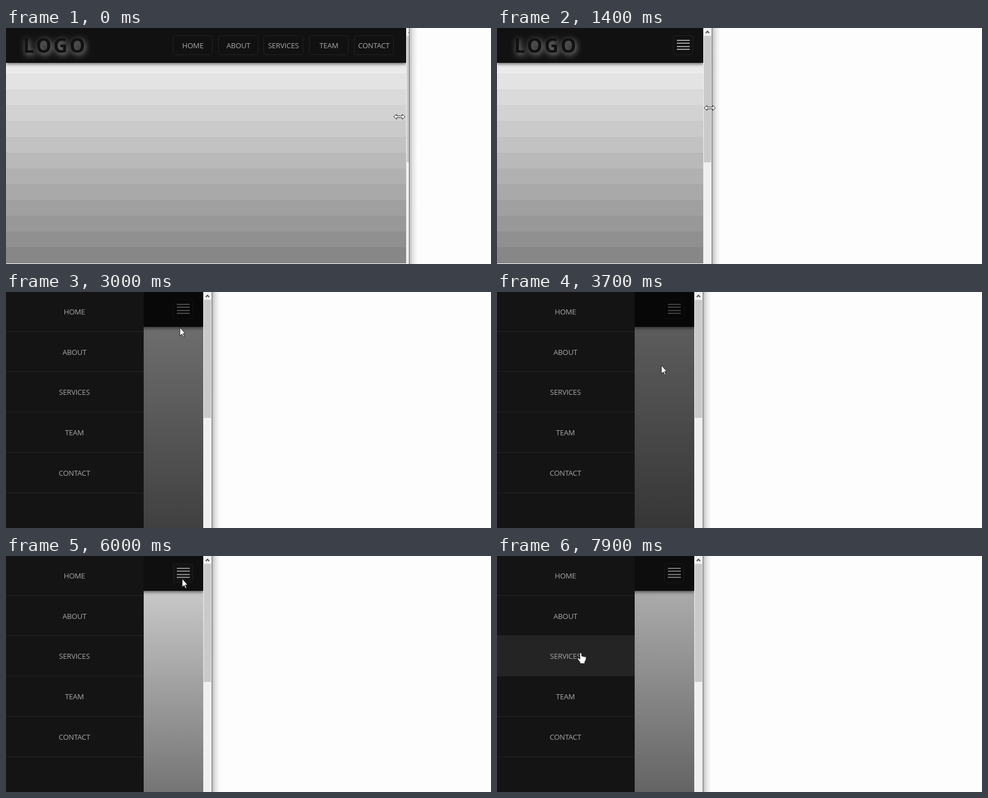
Recreate the animation shown at these times as an HTML page with a canvas. Size 863 by 420 pixels, loop 8000 ms.

```html
<!DOCTYPE html>
<html lang="en">
<head>
<meta charset="utf-8">
<title>Responsive menu</title>
<style>
  html, body { margin: 0; width: 100%; height: 100%; overflow: hidden; background: #fdfdfd; }
  canvas { display: block; }
</style>
</head>
<body>
<canvas id="stage" width="863" height="420"></canvas>
<script>
const ctx = document.getElementById('stage').getContext('2d');
const W = 863, H = 420, LOOP = 8000, STEP = 100;
const HEAD = 62, MENU = 245, ROW = 71.7, DIM = 0.6;
const DRAG_END = 1600, RELEASE = 1900;
const ITEMS = ['HOME', 'ABOUT', 'SERVICES', 'TEAM', 'CONTACT'];
const SESSIONS = [{ on: 2600, off: 4000 }, { on: 5700, off: 7900 }];

// Pointer moves after the window has been resized
const MOVES = [
  { from: 1800, to: 2300, x: 314, y: 42 },
  { from: 2900, to: 3700, x: 292, y: 130 },
  { from: 4400, to: 5200, x: 313, y: 40 },
  { from: 6100, to: 6500, x: 190, y: 115 },
  { from: 6500, to: 7100, x: 149, y: 172 }
];

const clamp = v => Math.max(0, Math.min(1, v));
const part = (t, from, to) => clamp((t - from) / (to - from));
const easeOut = (v, power = 2) => 1 - (1 - v) ** power;
const swing = v => 0.5 - Math.cos(clamp(v) * Math.PI) / 2;
const grey = v => `rgb(${v},${v},${v})`;

// The page lags behind the window edge, which covers part of the scrollbar.
function windowSize(t) {
  const edge = 718 - 96 * part(t, 0, 300) - 255 * easeOut(part(t, 400, DRAG_END), 1.55);
  const gap = 6 + 10 * easeOut(part(t, 0, DRAG_END), 1.35);
  return { edge: Math.round(edge), width: Math.round(edge - gap) };
}

function pointerAt(t, edge) {
  const drag = part(t, 0, DRAG_END);
  let x = edge - 18 + 18 * drag ** 2;
  let y = 158 - 16 * easeOut(drag);
  for (const m of MOVES) {
    const k = easeOut(part(t, m.from, m.to));
    x += (m.x - x) * k;
    y += (m.y - y) * k;
  }
  return { x, y };
}

// The menu slides in, then the page dims; closing runs the other way round.
function menuState(t) {
  let open = 0, dim = 0;
  for (const { on, off } of SESSIONS) {
    open += swing((t - on + 50) / 330) - swing((t - off - 45) / 300);
    dim += swing((t - on - 230) / 220) - swing((t - off + 119) / 220);
  }
  return { open, dim: Math.max(0, dim) * DIM };
}

function rect(x, y, w, h, fill) {
  ctx.fillStyle = fill;
  ctx.fillRect(x, y, w, h);
}

function box(x, y, w, h, fill) {
  ctx.beginPath();
  ctx.roundRect(x + 0.5, y + 0.5, w - 1, h - 1, 4);
  if (fill) { ctx.fillStyle = fill; ctx.fill(); }
  ctx.strokeStyle = '#222';
  ctx.lineWidth = 1;
  ctx.stroke();
}

function clipTo(x, w) {
  ctx.save();
  ctx.beginPath();
  ctx.rect(x, 0, w, H);
  ctx.clip();
}

function label(text, x, y) {
  ctx.font = '13px "Open Sans", "Noto Sans", sans-serif';
  ctx.letterSpacing = '-0.2px';
  ctx.textAlign = 'center';
  ctx.fillStyle = '#a8a8a8';
  ctx.fillText(text, x, y + 5);
}

function drawPage(w, dim) {
  if (dim > 0) {
    const g = ctx.createLinearGradient(0, HEAD, 0, H);
    g.addColorStop(0, grey(232));
    g.addColorStop(1, grey(135));
    rect(0, HEAD, w, H - HEAD, g);
    return;
  }
  for (let i = 0; i < 13; i++) {
    rect(0, Math.round(53 + i * 28.1), w, 29, grey(Math.round(235 - i * 8.3)));
  }
}

function drawLogo() {
  ctx.save();
  ctx.font = 'bold 35px "Open Sans", "Noto Sans", sans-serif';
  ctx.letterSpacing = '3.4px';
  ctx.textAlign = 'left';
  ctx.shadowColor = '#a0a0a0';
  ctx.shadowBlur = 11;
  ctx.shadowOffsetX = 2;
  ctx.shadowOffsetY = 3;
  ctx.fillStyle = '#111';
  ctx.fillText('LOGO', 30.5, 44);
  ctx.restore();
}

function drawHeader(w, lit) {
  ctx.save();
  ctx.shadowColor = 'rgba(0,0,0,.6)';
  ctx.shadowBlur = 6;
  ctx.shadowOffsetY = 2;
  rect(0, 0, w, HEAD, '#111');
  ctx.restore();
  drawLogo();
  if (w > 650) {
    ITEMS.forEach((name, i) => {
      const x = Math.round(w - 415 + i * 80.5);
      box(x, 13, 71, 35);
      label(name, x + 35.5, 31);
    });
  } else {
    box(w - 54, 13, 36, 35, lit && '#161616');
    for (let i = 0; i < 4; i++) rect(w - 47, Math.round(21 + i * 5.4), 23, 2, '#a0a0a0');
  }
}

function drawMenu(x, hover) {
  rect(x, 0, MENU, H, '#141414');
  ITEMS.forEach((name, i) => {
    const y = Math.round(i * ROW - 1);
    if (i === hover) rect(x, y, MENU, 72, '#242424');
    rect(x, Math.round((i + 1) * ROW - 2), MENU, 1, '#242424');
    label(name, x + 121.7, 35 + i * ROW);
  });
}

function drawScrollbar(x, edge, thumbEnd, hot) {
  clipTo(x, edge - x);
  rect(x, 0, edge - x, H, '#f0f0f0');
  rect(x + 1, 14, 13, thumbEnd - 14, hot ? '#a6a6a6' : '#cacaca');
  ctx.beginPath();
  ctx.moveTo(x + 4.5, 9);
  ctx.lineTo(x + 7.5, 6);
  ctx.lineTo(x + 10.5, 9);
  ctx.strokeStyle = '#505050';
  ctx.lineWidth = 2;
  ctx.stroke();
  ctx.restore();
}

function drawEdge(x) {
  rect(x - 1, 0, 1, H, '#666');
  const g = ctx.createLinearGradient(x, 0, x + 14, 0);
  g.addColorStop(0, 'rgba(0,0,0,.26)');
  g.addColorStop(0.4, 'rgba(0,0,0,.1)');
  g.addColorStop(1, 'rgba(0,0,0,0)');
  rect(x, 0, 14, H, g);
}

const arrow = new Path2D('M.5 .5V15.5L4 12.3L6.4 17.5L8.5 16.6L6.1 11.4H10.3Z');
const resize = new Path2D('M-10 0L-5 -4.5V-1.5H5V-4.5L10 0L5 4.5V1.5H-5V4.5Z');
const hand = new Path2D('M-1.5 12V1.5Q0 -1 1.7 1.5V6Q3.3 5 4.4 7.3Q6 5.7 7.1 7.7Q8.7 6.4 9.8 8.2'
  + 'Q10 13 7.3 16L7 19.5H-1L-1.3 17L-5.4 11.5Q-5.3 8.6 -3.2 9.8Z');

function drawPointer({ x, y }, shape) {
  ctx.save();
  ctx.translate(x, y);
  ctx.lineJoin = 'round';
  ctx.lineWidth = 1;
  ctx.strokeStyle = '#222';
  ctx.fillStyle = '#fff';
  ctx.fill(shape);
  ctx.stroke(shape);
  ctx.restore();
}

function draw(ms) {
  const t = Math.floor(ms / STEP) * STEP;
  const { edge, width } = windowSize(t);
  const { open, dim } = menuState(t);
  const p = pointerAt(t, edge);
  const onButton = p.x > width - 54 && p.x < width - 18 && p.y > 13 && p.y < 48;
  const onMenu = open > 0 && p.x < MENU;
  const pointing = onMenu || (onButton && open === 0);
  const onBar = t >= RELEASE && p.x > width;

  rect(0, 0, W, H, '#fdfdfd');
  clipTo(0, width);
  drawPage(width, dim);
  drawHeader(width, onButton);
  if (dim > 0) rect(0, 0, width, H, `rgba(0,0,0,${dim})`);
  if (open > 0) drawMenu(Math.round((open - 1) * MENU), onMenu ? Math.floor(p.y / ROW) : -1);
  ctx.restore();

  drawScrollbar(width, edge, t < SESSIONS[0].on ? 239 : 224, onBar);
  drawEdge(edge);
  drawPointer(p, t < RELEASE ? resize : pointing ? hand : arrow);
}

function tick() {
  draw(performance.now() % LOOP);
  requestAnimationFrame(tick);
}
tick();
</script>
</body>
</html>
```
